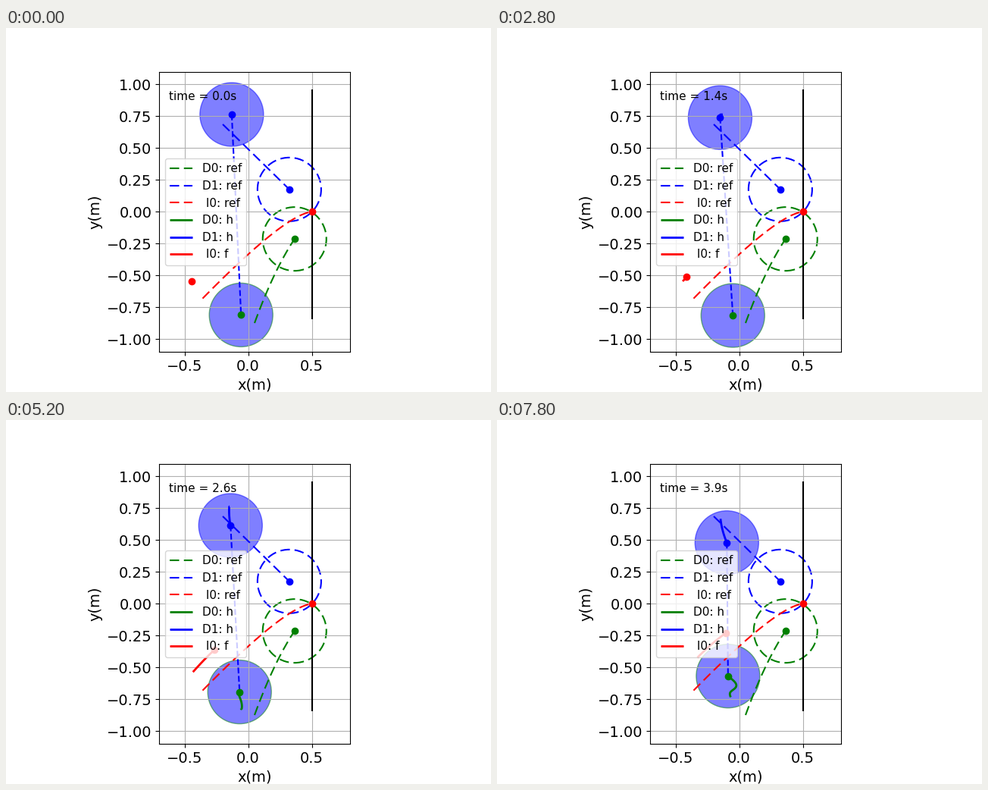
Write a matplotlib script that moves like this. It is 640 px wide and 480 px high and loops after 8 s.

```python
import numpy as np
import matplotlib.pyplot as plt
from matplotlib.animation import FuncAnimation

STEPS, DT, TAIL, RADIUS = 40, 0.1, 18, 0.25
DASH = (6, 3)

plt.rcParams["lines.solid_capstyle"] = "butt"


def ramp(t, start, soft):
    """Distance covered at unit speed after a soft start."""
    return soft * np.log1p(np.exp((t - start) / soft))


def bezier(a, b, c):
    u = np.linspace(0, 1, 60)[:, None]
    return ((1 - u) ** 2 * np.array(a) + 2 * u * (1 - u) * np.array(b) + u * u * np.array(c)).T


# All agents hover first, then glide off with some sway
t = np.arange(STEPS) * DT
go = ramp(t, 1.3, 0.1)
d0 = np.array([-0.056 + 0.0032 * t ** 2 * np.cos(3.4 * (t - 3.23)),
               -0.818 + 0.0945 * go + 0.010 * np.sin(3.1 * (t - 1.7))])
d1 = np.array([-0.150 + 0.0092 * (t - 1.5) ** 2,
               0.764 - 0.104 * ramp(t, 1.17, 0.08)])
i0 = np.array([-0.444 + 0.012 * t + 0.113 * go,
               -0.545 + 0.012 * t + 0.130 * go - 0.010 * go ** 2])
paths = [d0, d1, i0]
colors = ["green", "blue", "red"]
names = ["D0", "D1", " I0"]

fig = plt.figure(figsize=(6.4, 4.8), dpi=100)
ax = fig.add_subplot()
ax.set_aspect("equal")
ax.set_xlim(-0.7, 0.8)
ax.set_ylim(-1.1, 1.1)
ax.set_xticks([-0.5, 0, 0.5])
ax.set_yticks(np.arange(-1, 1.01, 0.25))
ax.tick_params(labelsize=14)
ax.set_xlabel("x(m)", fontsize=14)
ax.set_ylabel("y(m)", fontsize=14)
ax.grid(True)

ax.plot([0.5, 0.5], [-0.84, 0.96], color="black", lw=1.5)

# Reference paths, each ending at its goal
refs = [
    bezier((0.050, -0.873), (0.200, -0.460), (0.364, -0.213)),
    bezier((-0.200, 0.687), (0.062, 0.432), (0.323, 0.176)),
    bezier((-0.358, -0.680), (0.290, -0.020), (0.500, 0.000)),
]
for (x, y), c, name in zip(refs, colors, names):
    ax.plot(x, y, color=c, lw=1.5, dashes=DASH, label=f"{name}: ref")
    ax.plot(x[-1], y[-1], "o", color=c)
    if c != "red":
        ax.add_patch(plt.Circle((x[-1], y[-1]), RADIUS, fill=False, ec=c, lw=1.5, ls=(0, DASH)))

tails = [ax.plot([], [], color=c, lw=2, label=f"{name}: {'f' if c == 'red' else 'h'}")[0]
         for c, name in zip(colors, names)]
tether, = ax.plot([], [], color="blue", lw=1.5, ls="--")
dots = [ax.plot([], [], "o", color=c)[0] for c in colors]
bodies = [ax.add_patch(plt.Circle((0, 0), RADIUS, fc="blue", ec=c, alpha=0.5)) for c in colors[:2]]
clock = ax.text(0.05, 0.9, "", transform=ax.transAxes, fontsize=11)
ax.legend(loc="center left", fontsize=11)


def update(n):
    for p, tail, dot in zip(paths, tails, dots):
        tail.set_data(*p[:, max(0, n - TAIL):n + 1])
        dot.set_data(*p[:, n:n + 1])
    for p, body in zip(paths, bodies):
        body.center = p[:, n]
    tether.set_data(*np.transpose([d1[:, n], d0[:, n]]))
    clock.set_text(f"time = {n * DT:.1f}s")
    return [*tails, *dots, *bodies, tether, clock]


anim = FuncAnimation(fig, update, frames=STEPS, interval=200, repeat=True)
plt.show()
```
